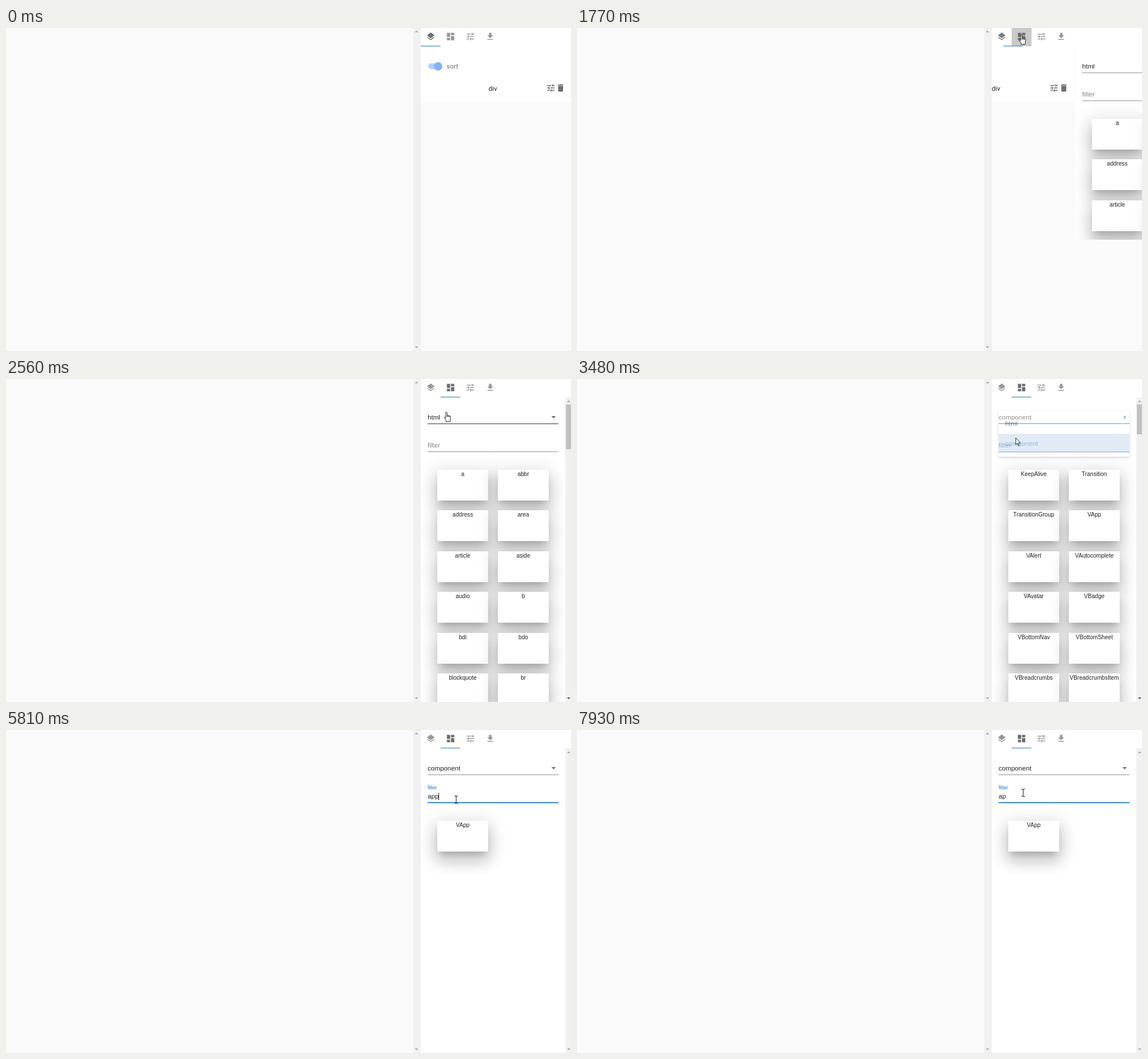
Write an HTML page that moves like this. It is 989 px wide and 566 px high and loops after 8000 ms.

```html
<!DOCTYPE html>
<html lang="en">
<head>
<meta charset="utf-8">
<title>Component builder</title>
<style>
html, body { margin: 0; width: 100%; height: 100%; overflow: hidden; background: #fafafa; }
#stage { position: relative; width: 989px; height: 566px; overflow: hidden; background: #fafafa; }
#stage svg { position: absolute; left: 0; top: 0; overflow: visible; }
#view { position: absolute; left: 726px; top: 32px; width: 263px; height: 534px; overflow: hidden; }
.pane { position: absolute; left: 0; top: 0; width: 263px; overflow: hidden; background: #fff; }
.card {
  position: absolute; width: 89px; height: 54px; border-radius: 1px; background: #fff; color: rgba(0,0,0,.87);
  font: 10.08px/16px "Liberation Sans", Arial, sans-serif; text-align: center; white-space: nowrap;
  box-shadow: 0 8px 11px -5px rgba(0,0,0,.2), 0 17px 27px 2px rgba(0,0,0,.14), 0 6.5px 33px 6px rgba(0,0,0,.12);
}
text { font-family: "Liberation Sans", Arial, sans-serif; font-size: 11.6px; fill: rgba(0,0,0,.87); }
text.ui { font-family: Roboto, sans-serif; }
#menuBox { filter: drop-shadow(0 2px 2.5px rgba(0,0,0,.3)); }
</style>
</head>
<body>
<div id="stage">
  <div id="view">
    <div class="pane" id="layers" style="height:97px">
      <svg width="263" height="534" viewBox="726 32 263 534">
        <rect x="739" y="62" width="22" height="10" rx="5" fill="#b2cfff"/>
        <circle cx="756.5" cy="67.8" r="7.4" fill="#000" opacity=".15"/>
        <circle cx="756.5" cy="67" r="7.2" fill="#82b1ff"/>
        <text class="ui" x="771" y="71" style="fill:#6b6b6b">sort</text>
        <text class="ui" x="852.2" y="109.5" text-anchor="middle">div</text>
        <g id="rowIcons" fill="#6c6c6c"></g>
      </svg>
    </div>
    <div class="pane" id="parts">
      <svg width="263" height="534" viewBox="726 32 263 534">
        <text id="pick" x="738" y="71"></text>
        <path id="chevron" d="M-3.8 -1.9H3.8L0 1.9Z"/>
        <rect id="pickLine" x="738" y="78" width="229" height="1"/>
        <rect id="pickFocus" x="738" y="77.4" width="229" height="1.6" fill="#1976d2"/>
        <text id="label" x="738">filter</text>
        <text id="query" x="738" y="120"></text>
        <rect id="caret" y="110" width="1" height="13" fill="#222"/>
        <rect x="738" y="127" width="229" height="1" fill="#949494"/>
        <rect id="queryFocus" y="126.4" height="1.8" fill="#1976d2"/>
      </svg>
    </div>
  </div>
  <svg width="989" height="566" viewBox="0 0 989 566">
    <rect x="713" width="13" height="566" fill="#f1f1f1"/>
    <path d="M715.6 7.6h6l-3-3zM715.6 558h6l-3 3z" fill="#a3a3a3"/>
    <path id="border" d="M0 0H713V566H0V562H709V3H0Z" fill="#f00"/>
    <rect x="726" width="263" height="32" fill="#fff"/>
    <rect id="ripple" x="761" width="34.6" height="32"/>
    <g id="tabs" fill="#6c6c6c"></g>
    <rect id="slider" y="31" width="34.6" height="1.2" fill="#3b8ad8"/>
    <g id="scroll">
      <rect x="979" y="32" width="10" height="534" fill="#f1f1f1"/>
      <path d="M982 40.6h6l-3-3z" fill="#a3a3a3"/>
      <path id="down" d="M982 558h6l-3 3z"/>
      <rect id="thumb" x="980" y="44.5" width="9" fill="#c1c1c1"/>
    </g>
    <g id="menu">
      <rect id="menuBox" x="738" y="56" width="229" height="80" rx="1" fill="#fff"/>
      <rect id="hover" x="738" y="96" width="229" height="34"/>
      <text id="itemA" x="749.5" y="82">html</text>
      <text id="itemB" x="749.5" y="117">component</text>
    </g>
    <g id="ghost" opacity=".75">
      <rect x=".6" y=".6" width="89.4" height="55" fill="#000" opacity=".1"/>
      <rect width="89" height="55" fill="#fff"/>
      <text x="44.5" y="11.3" text-anchor="middle" style="font-size:10.08px">VApp</text>
    </g>
    <g id="mouse">
      <circle id="glow" cx="-.5" cy="0" r="8.8" fill="#ffff54" opacity=".8"/>
      <g id="arrow" fill="#fff" stroke="#111" stroke-width=".9">
        <path id="parcel" d="M1.5 11H4.5V9.6H7.5V11H10V17H1.5Z" stroke="#444" stroke-width="1.3"/>
        <path d="M0 0V12L2.8 9.5 4.6 13.8 6.4 13 4.6 8.9H8.2Z"/>
      </g>
      <g id="hand" fill="#fff" stroke="#111" stroke-width=".9" stroke-linejoin="round">
        <path d="M-1.2 1.2Q-1.2 0 0 0Q1.2 0 1.2 1.2V5.6L6 6.8Q7.4 7.3 7.2 9L6.6 13V16.6H-.6V14.6L-3.6 10.4Q-4.2 8.6 -2.6 9L-1.2 10.4Z"/>
        <path d="M1.2 5.6V8.6M3.2 6.2V8.6M5.2 6.7V8.8" fill="none"/>
      </g>
      <path id="beam" d="M-3 -6.5Q-.5 -6.5 0 -5.5Q.5 -6.5 3 -6.5M0 -5.5V5.5M-3 6.5Q-.5 6.5 0 5.5Q.5 6.5 3 6.5"
        fill="none" stroke="#222" stroke-width="1.1"/>
    </g>
  </svg>
</div>
<script>
const $ = id => document.getElementById(id);
const set = (id, attrs) => { for (const k in attrs) $(id).setAttribute(k, attrs[k]); };
const show = (id, on) => { $(id).style.display = on ? '' : 'none'; };
const ramp = (t, a, b) => Math.min(1, Math.max(0, (t - a) / (b - a)));
const easeOut = u => 1 - (1 - u) ** 3;
const mix = (a, b, u) => a + (b - a) * u;

const ICONS = {
  layers: 'M11.99 18.54l-7.37-5.73L3 14.07l9 7 9-7-1.63-1.27-7.38 5.74zM12 16l7.36-5.73L21 9l-9-7-9 7 1.63 1.27L12 16z',
  board: 'M3 13h8V3H3v10zm0 8h8v-6H3v6zm10 0h8V11h-8v10zm0-18v6h8V3h-8z',
  tune: 'M3 17v2h6v-2H3zM3 5v2h10V5H3zm10 16v-2h8v-2h-8v-2h-2v6h2zM7 9v2H3v2h4v2h2V9H7zm14 4v-2H11v2h10zm-6-4h2V7h4V5h-4V3h-2v6z',
  save: 'M19 9h-4V3H9v6H5l7 7 7-7zM5 18v2h14v-2H5z',
  bin: 'M6 19c0 1.1.9 2 2 2h8c1.1 0 2-.9 2-2V7H6v12zM19 4h-3.5l-1-1h-5l-1 1H5v2h14V4z'
};
function addIcon(parent, name, x, y) {
  const p = document.createElementNS('http://www.w3.org/2000/svg', 'path');
  p.setAttribute('d', ICONS[name]);
  p.setAttribute('transform', `translate(${x} ${y}) scale(.72) translate(-12 -12)`);
  $(parent).appendChild(p);
  return p;
}
const tabs = ['layers', 'board', 'tune', 'save'].map((n, i) => addIcon('tabs', n, 743.5 + 34.7 * i, 15));
addIcon('rowIcons', 'tune', 953.8, 105);
addIcon('rowIcons', 'bin', 970.8, 105);

const TAGS = 'a abbr address area article aside audio b bdi bdo blockquote br'.split(' ');
const PARTS = ('KeepAlive Transition TransitionGroup VApp VAlert VAutocomplete VAvatar VBadge ' +
  'VBottomNav VBottomSheet VBreadcrumbs VBreadcrumbsItem VCalendar').split(' ');
const cards = TAGS.map((_, i) => {
  const c = document.createElement('div');
  c.className = 'card';
  c.style.left = (i % 2 ? 135 : 29) + 'px';
  c.style.top = 127 + 71.4 * (i >> 1) + 'px';
  $('parts').appendChild(c);
  return c;
});

// Screen refreshes: first time, last time, count
const BURSTS = [[0, 0, 1], [370, 670, 5], [840, 1220, 6], [1620, 2230, 9], [2380, 3170, 11], [3250, 4020, 11],
  [4090, 4340, 4], [4570, 4570, 1], [4950, 4950, 1], [5200, 5330, 2], [5810, 6590, 11], [6680, 7470, 11],
  [7530, 7530, 1], [7780, 7780, 1], [7930, 7930, 1]];
function refreshTime(t) {
  const [a, b, n] = BURSTS.filter(s => s[0] <= t + 1).pop();
  if (n < 2) return a;
  const d = (b - a) / (n - 1);
  return a + d * Math.min(n - 1, Math.floor((t - a + 4) / d));
}

const TRACK = [
  [0, 938, 548, ''], [369, 938, 548, 'arrow'], [670, 968, 104, 'hand'], [800, 968, 104, 'arrow'],
  [1220, 778, 12, 'hand'], [1848, 778, 12, 'hand'], [2230, 773, 50, 'hand'], [2340, 773, 50, 'hand'],
  [2538, 771, 58, 'hand'], [2860, 771, 58, 'arrow'], [3170, 768, 103, 'arrow'], [3600, 768, 103, 'beam'],
  [4020, 775, 104, 'beam'], [4950, 775, 104, ''], [5809, 788, 122, 'beam'], [5966, 781, 184, 'hand'],
  [6043, 781, 184, 'drag'], [6590, 470, 122, 'drag'], [6680, 464, 120, 'drag'], [6758, 464, 120, 'arrow'],
  [7200, 781, 110, 'beam'], [8001, 781, 110, 'beam']
];
function mouseAt(t) {
  let i = 0;
  while (TRACK[i + 1][0] <= t) i++;
  const [a, x, y, kind] = TRACK[i], [b, x2, y2] = TRACK[i + 1];
  const u = ramp(t, a, b), e = u * u * (3 - 2 * u);
  return { x: mix(x, x2, e), y: mix(y, y2, e), kind };
}

function drawMouse(t) {
  const { x, y, kind } = mouseAt(t), drag = kind === 'drag';
  show('mouse', kind);
  show('arrow', drag || kind === 'arrow');
  show('hand', kind === 'hand');
  show('beam', kind === 'beam');
  show('glow', drag);
  show('parcel', drag);
  set('mouse', { transform: `translate(${x} ${y})` });
  show('ghost', drag);
  set('ghost', { transform: `translate(${x - 26} ${y - 25})` });
  const onRow = t < 1200 && kind && y > 82 && y < 129;
  show('border', onRow || (drag && x < 713));
}

function drawTabs(t) {
  const p = easeOut(ramp(t, 1715, 2035));
  $('layers').style.transform = `translateX(${-265 * p}px)`;
  $('parts').style.transform = `translateX(${265 * (1 - p)}px)`;
  const grow = Math.max(0, (t - 1715) / 57.5) ** 3;
  $('parts').style.height = Math.min(534, 97 + 242 * grow) + 'px';
  show('scroll', t > 1840);
  set('slider', { x: 726 + 34.7 * easeOut(ramp(t, 1695, 2015)) });
  set('ripple', { opacity: .21 * ramp(t, 1560, 1750) * (1 - ramp(t, 1830, 2150)) });
  const swap = ramp(t, 1650, 2000);
  tabs[0].setAttribute('opacity', mix(1, .7, swap));
  tabs[1].setAttribute('opacity', t >= 1200 ? 1 : .7);
  tabs[2].setAttribute('opacity', .7);
  tabs[3].setAttribute('opacity', .7);
}

function drawList(html, query) {
  const all = html ? TAGS : PARTS;
  const list = all.filter(n => n.toLowerCase().includes(query));
  cards.forEach((c, i) => {
    c.style.display = i < list.length ? '' : 'none';
    c.textContent = list[i] || '';
  });
  const end = html ? 123 : query === '' ? 97 : query === 'a' ? 542 : 0;
  show('thumb', end);
  set('thumb', { height: Math.max(0, end - 44.5) });
  set('down', { fill: end ? '#505050' : '#a3a3a3' });
}

function drawFields(t) {
  const html = t < 3320;
  const query = t < 4950 ? '' : t < 5200 ? 'a' : t < 5330 || t >= 7930 ? 'ap' : 'app';
  drawList(html, query);

  const picking = t >= 2770 && t < 4085;
  $('pick').textContent = html ? 'html' : 'component';
  set('pickLine', { fill: t >= 2380 && t < 2770 ? '#333' : '#949494' });
  show('pickFocus', picking);
  const turn = 180 * ramp(t, 2700, 2930) * (1 - ramp(t, 3390, 3600));
  set('chevron', { transform: `translate(958.5 67) rotate(${turn})`, fill: picking ? '#1976d2' : '#6c6c6c' });

  const focus = (t >= 4085 && t < 6040) || t >= 7230;
  const up = easeOut(ramp(t, 4060, 4340));
  $('label').style.fontSize = mix(11.6, 8.7, up) + 'px';
  $('label').style.fill = focus ? '#1976d2' : '#858585';
  set('label', { y: mix(120, 104, up) });
  $('query').textContent = query;
  const line = t < 6040 ? easeOut(ramp(t, 4060, 4340)) : t < 7230 ? 0 : easeOut(ramp(t, 7200, 7530));
  set('queryFocus', { x: 852.5 - 114.5 * line, width: 229 * line });
  show('caret', (t >= 4085 && t < 4570) || (t >= 4950 && t < 6040) || (t >= 7230 && t < 7780));
  set('caret', { x: Math.round(738 + 6.45 * query.length) });

  const open = ramp(t, 2740, 2930), close = ramp(t, 3404, 3558);
  show('menu', open > 0 && close < 1);
  set('menu', { opacity: open * (1 - close), transform: `translate(0 56) scale(1 ${mix(.4, 1, easeOut(open))}) translate(0 -56)` });
  const over = mouseAt(t).y > 96, pressed = t >= 3250;
  set('hover', { fill: pressed ? '#1565c0' : '#000', opacity: pressed ? .25 : over ? .05 : 0 });
  $('itemA').style.fill = html ? '#1976d2' : '';
  $('itemB').style.fill = html ? '' : '#1976d2';
}

function frame(now) {
  const t = refreshTime(now % 8000);
  drawTabs(t);
  drawFields(t);
  drawMouse(t);
  requestAnimationFrame(frame);
}
const start = performance.now();
frame(0);
function run() { frame = null; }
</script>
</body>
</html>
```
